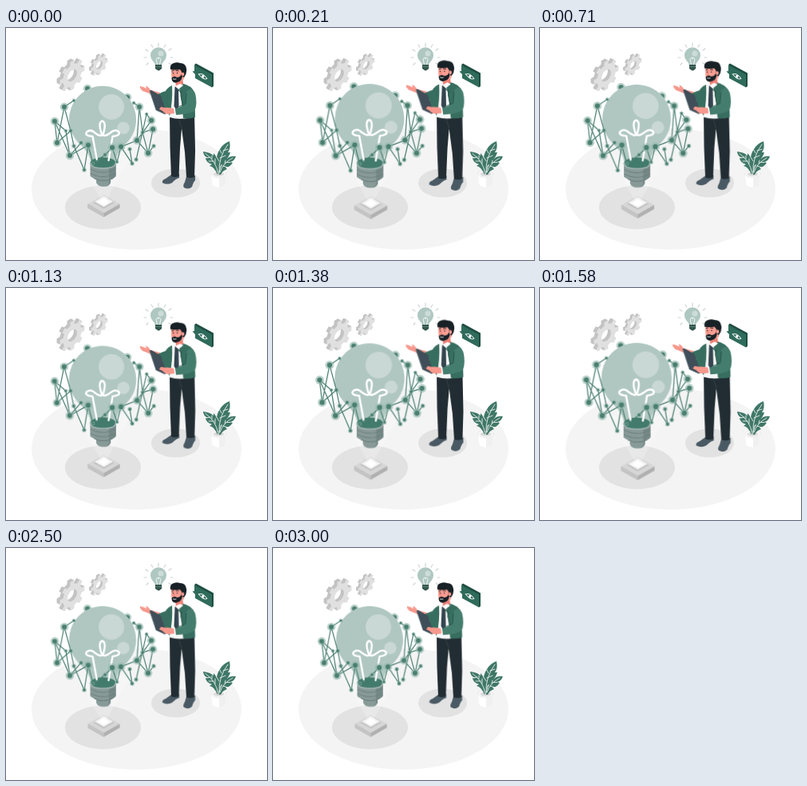
Animation, 327 px wide and 291 px high, one loop 3.04 s. Source, as an HTML page:

```html
<!DOCTYPE html>
<html lang="en">
<head>
<meta charset="utf-8">
<title>Bright idea</title>
<style>
html, body { margin: 0; width: 100%; height: 100%; overflow: hidden; background: #fff; }
svg { display: block; width: 100vw; height: 100vh; }
.pulse { animation: pulse 3040ms infinite; }
#lamp { transform-origin: 122px 155px; }
#man { transform-origin: 203px 122px; }
/* two beats, then a rest */
@keyframes pulse {
  0%, 35.63%, 71.25%, 100% { transform: scale(1); animation-timing-function: ease; }
  17.81%, 53.44% { transform: scale(1.05); animation-timing-function: ease; }
}
</style>
</head>
<body>
<svg viewBox="0 0 327 291" fill="none" stroke-linecap="round" stroke-linejoin="round">
  <g id="floor">
    <ellipse cx="163.5" cy="202" rx="131.5" ry="76" fill="#f4f4f4"/>
    <ellipse cx="121.5" cy="225" rx="47.5" ry="27.4" fill="#e2e2e2"/>
    <ellipse cx="212.5" cy="194.500" rx="30.500" ry="18" fill="#e2e2e2"/>
  </g>

  <g id="gears"></g>

  <g id="plant">
    <path d="M257 183l1.500 14q8 6 16 0l1.500-14z" fill="#fff"/>
    <path d="M267 187v13q5 0 7.500-3l1.500-14z" fill="#f0f0f0"/>
    <ellipse cx="266.500" cy="183" rx="9.500" ry="4.500" fill="#fafafa" stroke="#e6e6e6" stroke-width=".8"/>
    <ellipse cx="266.500" cy="183.300" rx="7" ry="2.800" fill="#dcdcdc"/>
    <g fill="#3f7767">
      <path d="M266 184C263 172 262 160 268 152Q272 145 280 142Q282 151 278 156L281 156Q279 163 275 165L278 166Q272 171 269 172Z"/>
      <path d="M265 184Q261 174 255 173L258 171Q250 168 250 163L253 163Q247 160 247 155Q256 156 260 160L260 157Q266 163 265 171Z"/>
      <path d="M267 184Q268 175 273 168L274 164L277 164Q281 160 288 161Q286 167 281 168L284 169Q280 175 275 175L277 177Q271 179 269 184Z"/>
    </g>
    <g stroke="#fff" stroke-width=".8">
      <path d="M267 181Q266 162 278 146M267 167l-3-5M268 163l7-3M270 157l-2-4M272 154l6-2"/>
      <path d="M265.500 181Q263 167 250 157.500M260 167l-6 0M256 162l-5 1M262 170l0-6M258 164l0-4"/>
      <path d="M268 181Q272 169 284 163M272 173l6 2M276 168.500l5 0M274 170l1-4"/>
    </g>
  </g>

  <g id="spark">
    <g stroke="#cfd3d3" stroke-width="1.200">
      <path d="M191 19v4M182 21l2 3M200 21l-2 3M175 27l3 2M207 26l-3 2M173 37h3M206 37h3M176 46l2-2M207 46l-3-2"/>
    </g>
    <path d="M187 47q0-3-3-5.500a10 10 0 1 1 14 0q-3 2.500-3 5.500z" fill="#afc7c1"/>
    <circle cx="194" cy="32" r="3.500" fill="#cddcd8"/>
    <path d="M189.500 46l-1.500-7q3-4 3 0q0-4 3 0l-1.500 7" stroke="#fff" stroke-width=".8"/>
    <path d="M187 46h8.200v5l-2 1.500q-2 2-4 0l-2.200-1.500z" fill="#33564e"/>
    <path d="M187.500 48.500h7" stroke="#6f8b84" stroke-width=".7"/>
  </g>

  <g id="bubble">
    <path d="M236 46l2-1.500 22 12v16.500l-2 1.500z" fill="#1f4d41"/>
    <path d="M236 46.500l22 11.800v16.200l-21-11.500V58l-3.500-3.500 2.500-.5z" fill="#2f6b5b"/>
    <path d="M241.500 58q5-2.500 10.500 5.500q-5 2.500-10.500-5.500z" stroke="#fff" stroke-width="1"/>
    <ellipse cx="246.800" cy="60.800" rx="1.600" ry="2" fill="#fff"/>
  </g>

  <g id="lamp" class="pulse">
    <g id="base">
      <path d="M102.500 220.500v5l20 11.500 20-11.500v-5z" fill="#b0b0b0"/>
      <path d="M102.500 220.500v5l20 11.500v-5z" fill="#c4c4c4"/>
      <path d="M122.500 209l20 11.500-20 11.500-20-11.500z" fill="#d6d6d6"/>
      <path d="M122.500 211.500l13 7.500-13 7.500-13-7.500z" fill="#c2c2c2"/>
      <path d="M122.500 211l11.500 6.700-11.500 6.700-11.500-6.700z" fill="#f3f3f3"/>
      <path d="M122.500 213.500l7.500 4.300-7.500 4.300-7.500-4.300z" fill="#fff"/>
    </g>
    <path d="M122.500 222L88 160h68z" fill="#fff" opacity=".22"/>
    <g id="back"></g>
    <path d="M106 168Q105 158 94 147A42 42 0 1 1 148 147Q138 158 137.500 168z" fill="#b0c7c1"/>
    <circle cx="132" cy="99" r="16" fill="#c9d8d4"/>
    <circle cx="147" cy="125.500" r="7.800" fill="#c9d8d4"/>
    <path d="M105.500 168v18q4 3 7.500 4v4q2 5 9 5t9-5v-4q4-1 6.500-4v-18z" fill="#879a98"/>
    <path d="M129 176v18q-1 4-5 5q5-.5 7-5v-4q4-1 6.500-4v-15z" fill="#748886"/>
    <path d="M106 177q15 8 31 0M106 182.500q15 8 31 0M111 189q11 5 22 0" stroke="#6d807e" stroke-width="1"/>
    <ellipse cx="121.500" cy="169" rx="15.800" ry="6.800" fill="#427b6c"/>
    <path d="M105.700 169q0 7 15.800 7t15.800-7" stroke="#a0b4b0" stroke-width="1.600"/>
    <path d="M114 166L108.500 136Q98 135 101 130.500Q106 126 112 132Q120 138 122 132Q126 118 120.500 116.500Q115 118 119.500 132Q122 138 130 132Q137 126 141.500 130.500Q143 135 133.500 136L128.500 166" stroke="#fff" stroke-width="2.400"/>
    <g id="net"></g>
  </g>

  <g id="man" class="pulse">
    <g id="legs">
      <path d="M207 184l-7 5q-5 2-4 5q6 3 12 0q5-5 9-6l0-5z" fill="#4a5a64"/>
      <path d="M226 186l-2 7q-3 5-1 7q6 3 10-1q2-7 4-8v-6z" fill="#4a5a64"/>
      <path d="M205 109l.500 40 1.500 37q5 2 9.500 0l1.500-36 2-24 4 30 2 31q5 2 10 0l1-33-1-46z" fill="#222d33"/>
      <path d="M220 125l-3-9" stroke="#3a474e" stroke-width=".8"/>
    </g>
    <path d="M204 74q8-5 17-4l9 4 2 38q-15 4-27 0z" fill="#f6f7f7"/>
    <path d="M211.500 74l3-1 1.500 3 .5 22-3 6-3-6z" fill="#34454f"/>
    <path d="M219 69q14 3 17 12l1 31q-9 3-15 1q-2-25-5-37z" fill="#376e5f"/>
    <path d="M208 72q-9 4-10 13l-4 13 8 8 3 4q4-18 3-38z" fill="#376e5f"/>
    <path d="M219 70l-3 8 4 3-1 4 4 20" stroke="#26564a" stroke-width="1"/>
    <path d="M191 86q-8-1-12-4l-8-3q-4-4-3-6q5 1 8 3l-1-3q3 0 6 5l12 3z" fill="#f7988d"/>
    <path d="M204 78q-9 2-15 6l2 8q8-1 13-5z" fill="#376e5f"/>
    <path d="M180 79q0-1 2-1l12 7 7 21q0 2-2 2l-11-5z" fill="#3f4e58"/>
    <path d="M180 79l8 24 11 5" stroke="#64737b" stroke-width=".8"/>
    <path d="M213 102q-10-3-14-2l-5-1-2 3 4 2q3 4 8 4l9-1z" fill="#f7988d"/>
    <path d="M226 80q6-8 11 2q3 13-.5 21q-4 5-24 6l-1-8q9-2 13-6z" fill="#447d6d"/>
    <path d="M226 82l-1 13-9 4" stroke="#26564a" stroke-width=".9"/>
    <path d="M211 101l1 8" stroke="#fff" stroke-width="1.600"/>

    <g id="head">
      <path d="M212 64l9-4 1 10q-4 5-9 5z" fill="#ee8075"/>
      <path d="M207 49q8-4 17 1l-1 14q-6 5-11 4q-5-1-5-10z" fill="#f99e93"/>
      <path d="M206 52q-1-5 2-7q5-3 10-1q7 0 8 7q1 6-3 11l-3-2v-5l-2-3q-6 1-12 0z" fill="#182126"/>
      <path d="M221 58q0 9-6 10q-5 2-7-2q-1-3 0-4q4-2 6 0q5 0 6-5z" fill="#182126"/>
      <ellipse cx="221.500" cy="58" rx="1.800" ry="2.300" fill="#f99e93"/>
      <path d="M209.500 64q2 .8 3.500 0" stroke="#fff" stroke-width=".9"/>
      <path d="M208 54l2-.5M213 53.500l3 .3" stroke="#182126" stroke-width=".9"/>
      <circle cx="209.300" cy="56.500" r=".7" fill="#182126"/>
      <circle cx="214.500" cy="56.500" r=".7" fill="#182126"/>
      <path d="M211 56.500l-1.300 3.500 1.500.3" stroke="#e5736a" stroke-width=".7"/>
    </g>
    <path d="M212 73l6-3 4 2-6 5z" fill="#fff"/>
  </g>
</svg>
<script>
const $ = id => document.getElementById(id);
const add = (parent, tag, attrs) => {
  const el = document.createElementNS("http://www.w3.org/2000/svg", tag);
  for (const k in attrs) el.setAttribute(k, attrs[k]);
  return parent.appendChild(el);
};

// Cog seen on an isometric wall
function cogPath(x, y, r, teeth) {
  const at = (rad, a) => {
    const u = rad * Math.cos(a), v = rad * Math.sin(a);
    return (x + u * 0.866).toFixed(2) + " " + (y + v - u * 0.5).toFixed(2);
  };
  const step = 2 * Math.PI / teeth, pts = [], hole = [];
  for (let i = 0; i < teeth; i++) {
    const a = i * step;
    pts.push(at(r * 0.76, a - step * 0.27), at(r, a - step * 0.2),
             at(r, a + step * 0.2), at(r * 0.76, a + step * 0.27));
  }
  for (let i = 0; i < 24; i++) hole.push(at(r * 0.38, -i * Math.PI / 12));
  return "M" + pts.join("L") + "ZM" + hole.join("L") + "Z";
}
function cog(x, y, r, depth) {
  for (let d = depth; d >= 0; d -= 0.5) {
    add($("gears"), "path", {
      d: cogPath(x - d, y - d * 0.5, r, 8),
      fill: d ? "#c3c3c3" : "#e0e0e0", "fill-rule": "evenodd"
    });
  }
}
cog(83, 59.5, 18, 4);
cog(117, 46.500, 12.200, 2.500);

const GREEN = "#4a7f70";
function node(parent, [x, y, r]) {
  if (r > 2.5) add(parent, "circle", { cx: x, cy: y, r: r * 1.75, fill: "#8fb5aa", opacity: 0.62 });
  else add(parent, "circle", { cx: x, cy: y, r: r * 1.6, fill: "#8fb5aa", opacity: 0.6 });
  add(parent, "circle", { cx: x, cy: y, r, fill: GREEN });
}
[[102, 76, 3], [152, 87, 3]].forEach(p => node($("back"), p));

// Each strand is a chain of x, y, radius
const strands = [
  [[85, 91, 1.5], [73, 99, 3], [64, 144, 3], [61, 117, 3], [80, 160, 3], [103, 147, 3], [109, 170, 1.5], [124, 159, 1.8], [133, 150, 3]],
  [[73, 99, 3], [81, 129, 1.8], [64, 144, 3]],
  [[61, 117, 3], [75, 129, 1.5], [80, 160, 3], [94, 144, 1.8]],
  [[81, 129, 1.8], [85, 148, 1.8], [98, 178, 1.8], [103, 147, 3]],
  [[133, 150, 3], [139, 168, 1.5], [144, 149, 3], [158, 170, 1.8], [155, 152, 1.8]],
  [[160, 94, 1.5], [167, 99, 3], [171, 131, 1.8], [178, 157, 3], [164, 141, 3], [182, 116, 3], [176, 108, 1.5], [163, 165, 1.8]],
  [[167, 99, 3], [164, 141, 3], [144, 149, 3]],
  [[171, 131, 1.8], [184, 127, 3], [178, 157, 3], [185, 148, 1.8]]
];
const net = $("net");
strands.forEach(s => add(net, "polyline", {
  points: s.map(p => p[0] + "," + p[1]).join(" "), stroke: GREEN, "stroke-width": 1.2
}));
const seen = new Set();
strands.flat().forEach(p => {
  const key = p[0] + "," + p[1];
  if (!seen.has(key)) node(net, p);
  seen.add(key);
});
</script>
</body>
</html>
```
